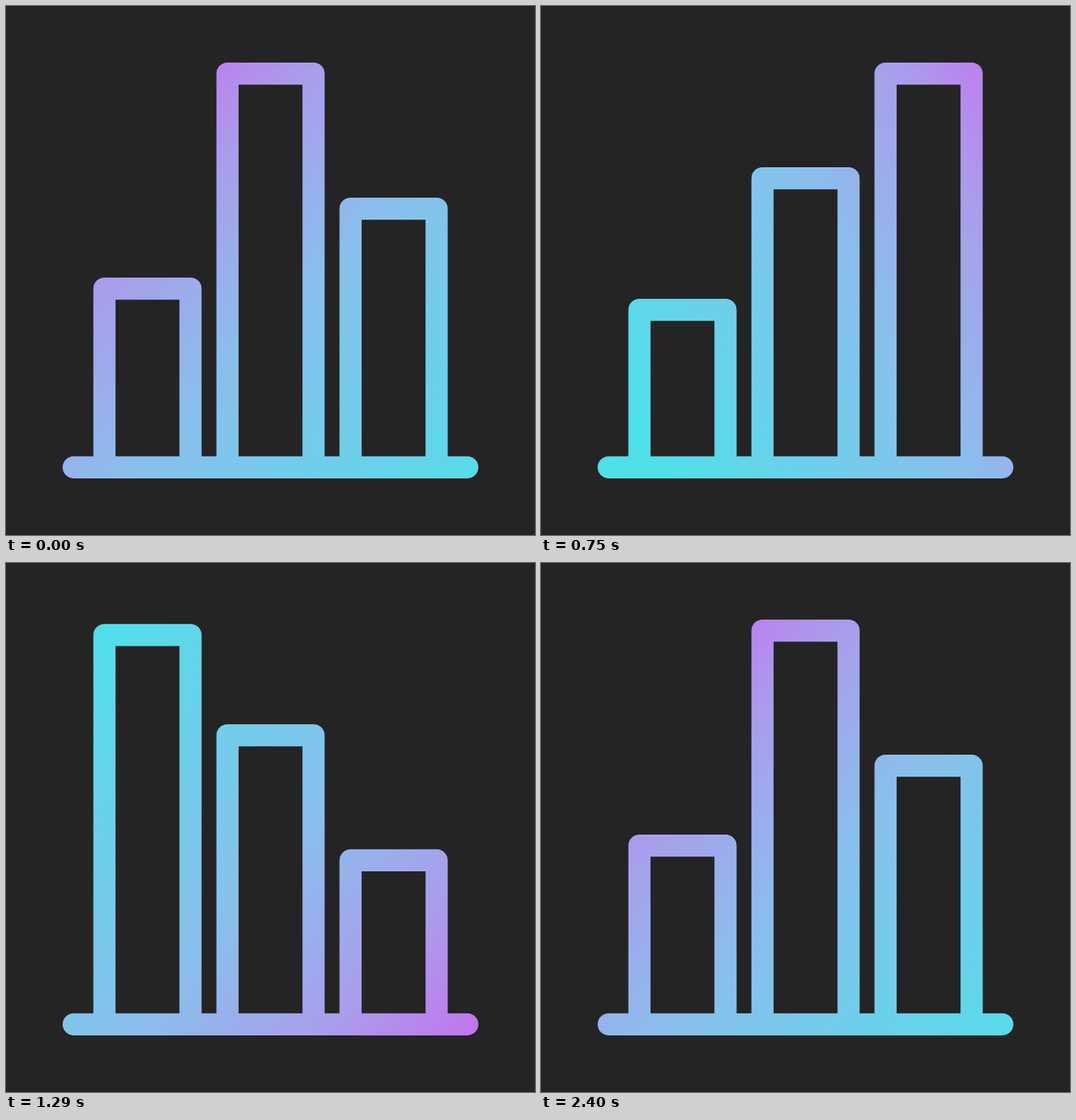
Write an HTML page that moves like this. It is 748 by 748 pixels and loops after 2.43 s.

```html
<!DOCTYPE html>
<html lang="en">
<head>
<meta charset="utf-8">
<title>Bar chart</title>
<style>
  html, body { margin: 0; width: 100%; height: 100%; overflow: hidden; background: #242424; }
  svg { display: block; width: 100%; height: 100%; }
</style>
</head>
<body>
<svg viewBox="0 0 748 748">
  <defs>
    <linearGradient id="tint" gradientUnits="userSpaceOnUse">
      <stop offset="0" stop-color="#4fe0e8"/>
      <stop offset=".5" stop-color="#8abfec"/>
      <stop offset=".75" stop-color="#aa9dec"/>
      <stop offset="1" stop-color="#c969ef"/>
    </linearGradient>
  </defs>
  <path id="chart" fill="none" stroke="url(#tint)" stroke-width="31.3"
        stroke-linecap="round" stroke-linejoin="round"/>
</svg>
<script>
const LOOP = 2430, CYCLE = 2400, STEP = 30;
const SEGMENT = 800, MOVE = 605;
const BASE = 652.3, HALF = 15.65, CENTER = 374;

// Outer top edge of each bar in the three poses
const poses = [[384, 80, 271], [414, 228, 80], [80, 228, 411]];

// Gradient: time, direction in degrees, length, value at the centre
const turns = [
  [0, -136, 832, .565],
  [420, -74, 832, .5],
  [930, -5, 740, .39],
  [1290, 41, 832, .45],
  [1740, 117, 832, .52],
  [1920, 147, 832, .53]
];

const chart = document.getElementById('chart');
const tint = document.getElementById('tint');

function bezier(a, b, s) {
  const r = 1 - s;
  return 3 * r * r * s * a + 3 * r * s * s * b + s * s * s;
}

function ease(x) {
  if (x >= 1) return 1;
  let lo = 0, hi = 1;
  for (let i = 0; i < 24; i++) {
    const mid = (lo + hi) / 2;
    if (bezier(.3, .14, mid) < x) lo = mid; else hi = mid;
  }
  return bezier(0, 1, lo);
}

// Key i, continued past both ends of the cycle
function turn(i) {
  const n = turns.length, lap = Math.floor(i / n);
  const [t, angle, length, value] = turns[i - lap * n];
  return [t + lap * CYCLE, angle + lap * 360, length, value];
}

// Smooth curve through the gradient keys
function gradientAt(t) {
  let i = 0;
  while (turn(i + 1)[0] <= t) i++;
  const [a, b, c, d] = [-1, 0, 1, 2].map(k => turn(i + k));
  const span = c[0] - b[0], s = (t - b[0]) / span;
  return [1, 2, 3].map(k => {
    const m0 = (c[k] - a[k]) / (c[0] - a[0]) * span;
    const m1 = (d[k] - b[k]) / (d[0] - b[0]) * span;
    const q = s * s * (3 - 2 * s);
    return b[k] + (c[k] - b[k]) * q + m0 * s * (1 - s) ** 2 - m1 * s * s * (1 - s);
  });
}

function draw(t) {
  const seg = Math.floor(t / SEGMENT);
  const p = ease((t - seg * SEGMENT) / MOVE);
  const from = poses[seg % 3], to = poses[(seg + 1) % 3];
  let path = `M95.7 ${BASE}H652.3`;
  from.forEach((top, i) => {
    const x = 139.2 + 174 * i;
    const y = top + (to[i] - top) * p + HALF;
    path += `M${x} ${BASE}V${y}H${x + 121.7}V${BASE}`;
  });
  chart.setAttribute('d', path);

  const [angle, length, value] = gradientAt(t);
  const rad = angle * Math.PI / 180;
  const put = (end, dist) => {
    tint.setAttribute('x' + end, CENTER + Math.cos(rad) * dist);
    tint.setAttribute('y' + end, CENTER + Math.sin(rad) * dist);
  };
  put(1, -value * length);
  put(2, (1 - value) * length);
}

const start = performance.now();
function tick() {
  const t = (performance.now() - start) % LOOP;
  draw(Math.floor(t / STEP) * STEP % CYCLE);
  requestAnimationFrame(tick);
}
tick();
</script>
</body>
</html>
```
